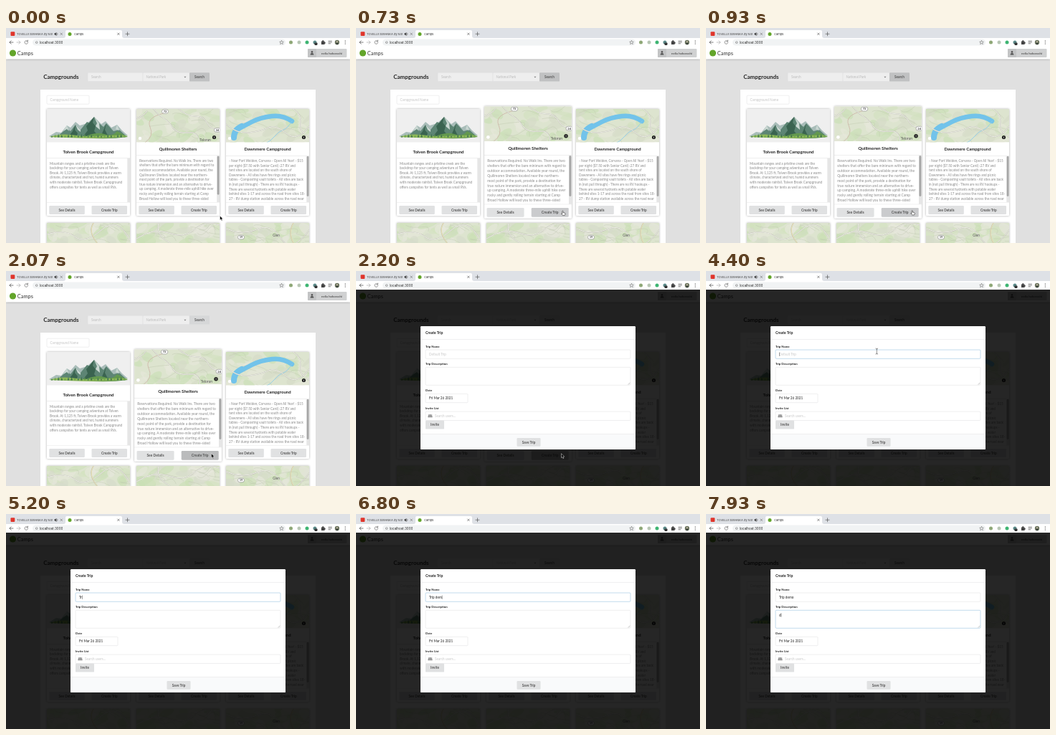
Recreate the animation shown at these times as an HTML page. Size 480 by 300 pixels, loop 8000 ms.

```html
<!DOCTYPE html>
<html lang="en">
<head>
<meta charset="utf-8">
<title>Camps</title>
<style>
html, body { margin: 0; width: 100%; height: 100%; overflow: hidden; background: #e0e0e0; }
svg { display: block; }
text { font-family: Lato, sans-serif; white-space: pre; }
.ui { font-family: Inter, sans-serif; }
.b { font-weight: 700; }
.mid { text-anchor: middle; }
.line { fill: none; stroke-linecap: round; stroke-linejoin: round; }
.raised { filter: drop-shadow(0 .6px 1.4px #0005); }
</style>
</head>
<body>
<svg id="stage" width="480" height="300" viewBox="0 0 480 300"></svg>
<script>
const LOOP = 8000, FPS = 15;
const GREY = '#e0e1e2', INK = '#222';

// Markup helpers
const rect = (x, y, w, h, fill, more = '') =>
  `<rect x="${x}" y="${y}" width="${w}" height="${h}" fill="${fill}" ${more}/>`;
const circle = (x, y, r, fill) => `<circle cx="${x}" cy="${y}" r="${r}" fill="${fill}"/>`;
const path = (d, fill, more = '') => `<path d="${d}" fill="${fill}" ${more}/>`;
const line = (d, color, width, more = '') =>
  `<path class="line" d="${d}" stroke="${color}" stroke-width="${width}" ${more}/>`;
const text = (x, y, s, size = 4.67, fill = INK, cls = '', more = '') =>
  `<text x="${x}" y="${y}" font-size="${size}" fill="${fill}" class="${cls}" ${more}>${s}</text>`;
const button = (x, y, w, h, label, id = '') =>
  rect(x, y, w, h, GREY, `rx="1.2" ${id && `id="${id}"`}`) +
  text(x + w / 2, y + h / 2 + 1.65, label, 4.67, '#555', 'b mid');
const field = (x, y, w, h, id = '', fill = '#fff') =>
  rect(x, y, w, h, fill, `rx="1.2" stroke="#dcdddf" stroke-width=".5" ${id && `id="${id}"`}`);

function random(seed) {
  return () => (seed = (seed * 16807) % 2147483647) / 2147483647;
}

function browser() {
  const extensions = [[397.5, '#8fa878'], [409, '#b9c7b5'], [420, '#3fb573'], [431, '#5d8b8a']];
  return rect(0, 0, 480, 14, '#dee1e6') +
    rect(6.5, 5.3, 5.8, 5.8, '#e0362c', 'rx="1"') +
    `<svg width="65" height="14">${text(15, 9.8, 'TOVELUI SERANKA by Nor', 4, '#444', 'ui')}</svg>` +
    path('M67.5 7.3h1.3l1.6-1.4v5l-1.6-1.4h-1.3z', '#444') +
    line('M71.6 7.2q1 1.2 0 2.4', '#444', .5) +
    line('M76 7l2.6 2.6m0-2.6l-2.6 2.6', '#555', .55) +
    path('M80 14q3 0 3-3V5q0-2 2-2h75q2 0 2 2v6q0 3 3 3z', '#fff') +
    circle(89, 8.5, 2.5, '#63a52b') + text(95, 9.9, 'Camps', 4, '#333', 'ui') +
    line('M155.6 7l2.6 2.6m0-2.6l-2.6 2.6M167 8.3h5m-2.5-2.5v5', '#444', .6) +
    rect(0, 14, 480, 12, '#fff') +
    rect(37, 15.4, 353, 9.2, '#f1f3f4', 'rx="4.6"') +
    line('M10 20H5m2.2-2.2L5 20l2.2 2.2', '#444', .7) +
    line('M15 20h5m-2.2-2.2L20 20l-2.2 2.2', '#aaa', .7) +
    line('M30.2 18.6A2.3 2.3 0 1 0 30.6 20.5M30.5 17v1.8h-1.8', '#555', .65) +
    circle(42.8, 20, 1.6, '#666') + circle(42.8, 20, 1, '#f1f3f4') +
    text(47, 21.6, 'localhost:3000', 4.6, '#222', 'ui') +
    path('M384.5 17.3l.8 1.9 2 .1-1.5 1.3.5 2-1.8-1.1-1.8 1.1.5-2-1.5-1.3 2-.1z', 'none', 'stroke="#555" stroke-width=".5"') +
    extensions.map(([x, c]) => circle(x, 20, 2.5, c)).join('') +
    rect(430.5, 20.5, 4, 3.4, '#333', 'rx=".8"') +
    path('M440 18.5h1.3q0-1.4 1-1.4t1 1.4h1.3v1.3q1.3 0 1.3 1t-1.3 1v1.2H440z', '#444') +
    line('M450 18.2h4.5M450 20h4.5M450 21.8h2.7', '#555', .7) +
    circle(462, 20, 3.2, '#6d7661') + circle(462, 19.4, 1.1, '#d0c3ae') + circle(462, 21.8, 1.5, '#38413a') +
    [17.9, 20, 22.1].map(y => circle(473.3, y, .55, '#444')).join('');
}

function terrain(x, y, h, seed, details) {
  const rnd = random(seed);
  let out = rect(0, 0, 116, h, '#dde4cf');
  for (let i = 0; i < 34; i++) {
    const cx = rnd() * 116, cy = rnd() * h;
    out += `<ellipse cx="${cx}" cy="${cy}" rx="${4 + rnd() * 12}" ry="${2 + rnd() * 6}"
      fill="${['#c9dfb4', '#e8e8dd', '#d3e2c0', '#d6dac9'][i % 4]}" opacity=".6" transform="rotate(${rnd() * 90 - 45} ${cx} ${cy})"/>`;
  }
  for (let i = 0; i < 10; i++) {
    const a = rnd() * 116, b = rnd() * h;
    out += line(`M${a} ${b}q${rnd() * 16} ${rnd() * 14 - 7} ${10 + rnd() * 14} ${rnd() * 12 - 6}t10 6`, '#bcc5ac', .4);
  }
  return `<svg x="${x}" y="${y}" width="116" height="${h}">${out}${details}</svg>`;
}
const road = (d, color = '#f6f6f0') => line(d, '#bfc0b4', 1.4) + line(d, color, .8);
const shield = (x, y, n) =>
  rect(x - 4.5, y - 2.8, 9, 5.6, '#fff', 'rx="2.8" stroke="#777" stroke-width=".5"') +
  text(x, y + 1.4, n, 4, '#444', 'b mid');
const mapMarks = circle(5, 41, 2.2, '#fff') + circle(108.5, 39.5, 2.6, '#222') +
  text(108.5, 41, 'i', 4.2, '#fff', 'b mid');

function mountains(x, y) {
  return `<g transform="translate(${x} ${y})">` + rect(0, 0, 116, 46.5, '#efefef') +
    path('M3 38L13 32 20 33 28 23 33 26 40 18 46 23 56 20 66 11 76 21 82 17 90 26 98 22 105 30 113 37z', '#a9bdb9') +
    path('M14 39L28 27 33 31 40 22 47 29 56 18 60 20 66 11 73 20 79 25 83 20 93 31 101 29 112 39z', '#5d8574') +
    path('M66 11L64 19 68 24 66 31 73 39H50L57 30 55 24z M40 22L39 29 43 34 41 39H30L36 31z M83 20l-2 9 5 10H75z', '#3a6350') +
    path('M66 11l4 9-2 4 6 5-1-9z M40 22l3 7 4 3v-3z M28 23l-5 8 5-3 3 3z M98 22l-2 6 5 2z', '#cbd8d3') +
    path('M50 40Q68 31 80 35T98 31L113 39Q84 43 50 40', '#63984f') +
    path('M3 39Q18 34 34 36T58 38 88 37 113 38Q78 43 3 39', '#8fb958') +
    Array.from({ length: 23 }, (_, i) => {
      const tx = 7 + i * 4.6, h = 2 + 3 * Math.abs(Math.sin(i * 2.3));
      return path(`M${tx} ${39.5 - h}l1.4 ${h}h-2.8z`, ['#3c704b', '#6ba24f', '#467a55'][i % 3]);
    }).join('') + '</g>';
}

function card(x, image, title, titleY, firstY, lines, thumbHeight, id) {
  const top = titleY + 9;
  return `<g id="${id}">` +
    rect(x, 113, 116, 149, '#fff', 'rx="1.2" class="raised"') + image +
    text(x + 58, titleY + 2, title, 6, INK, 'b mid') +
    rect(x, top, 116, .4, '#d5d5d5') +
    `<svg x="${x}" y="${top}" width="116" height="${243 - top}">` +
    lines.map((s, i) => text(4, firstY - top + 1.6 + i * 6.6, s, 4.67, '#8a8a8a')).join('') +
    rect(112.3, .4, 3.7, 70, '#e6e6e6') + rect(112.7, 1, 2.8, thumbHeight, '#a6a6a6', 'rx="1.4"') + '</svg>' +
    rect(x, 243, 116, .4, '#ddd') +
    button(x + 3.3, 248, 49.5, 12, 'See Details') +
    button(x + 62.5, 248, 49.5, 12, 'Create Trip', id + 'Create') + '</g>';
}

function page() {
  const shelterMap = terrain(182, 113, 46.5, 71,
    line('M12 47Q25 38 19 25T38 6', '#cdb7a8', .8) +
    road('M24 0Q31 9 38 13T51 26 72 33 87 46') + road('M59 0Q70 10 82 10T99 20 116 27') +
    road('M0 13Q10 10 15 3') +
    shield(40, 3.5, '72') + shield(113, 29.5, '24') + text(96, 44.5, 'Teloran', 4.8, '#555', 'mid') + mapMarks);
  const bayMap = terrain(307, 113, 46.5, 913,
    line('M11 40Q11 29 22 24', '#72c3ea', 8) +
    line('M14 29Q25 24 36 18T64 10Q79 8 92 17', '#72c3ea', 6.5) +
    line('M92 17Q86 27 80 29T68 38 57 47', '#86cbec', .8) +
    road('M0 21Q15 35 32 33T59 26 84 34 116 24') + road('M94 0Q106 8 104 20T116 39') +
    mapMarks);
  const below = [
    terrain(57, 272, 28, 43, road('M0 16Q25 8 39 19T76 10 116 24') + road('M65 0Q57 12 70 28', '#f3e6af')),
    terrain(182, 272, 28, 287, road('M0 22Q24 6 45 14T81 9 116 3') + road('M31 0Q26 17 47 28')),
    terrain(307, 272, 28, 519, road('M0 8Q23 18 43 9T77 22 116 10') + road('M94 0Q86 14 94 28', '#f3e6af') +
      text(70, 18.5, 'Glen', 4.7, '#555', 'mid') + shield(21, 20, '19'))
  ];
  return rect(0, 26, 480, 274, '#e0e0e0') +
    rect(0, 26, 480, 17.5, '#fff', 'class="raised"') +
    circle(9.5, 35, 4.6, '#63a52b') + text(15.8, 37.5, 'Camps', 7.4, '#333') +
    rect(421, 29, 54.5, 12, '#d0d1d2', 'rx="1.2"') + rect(421, 29, 12, 12, '#c3c4c5', 'rx="1.2"') +
    circle(427, 33.4, 1.3, '#555') + path('M424.5 37.5q0-2.4 2.5-2.4t2.5 2.4z', '#555') +
    text(454.5, 36.7, 'nelia hokorashi', 4.3, '#555', 'b mid') +
    text(52.2, 71.3, 'Campgrounds', 8, INK, 'b') +
    field(114, 62.3, 77, 12.2, '', '#eee') + text(119, 70.1, 'Search', 4.67, '#bbb') +
    field(191, 62.3, 65, 12.2, '', '#eee') + text(195.5, 70.1, 'National Park', 4.67, '#bbb') +
    path('M248.4 67.8h3l-1.5 1.7z', '#777') +
    rect(256, 62.2, 28, 12.4, GREY, 'id="search" rx="1.2"') + text(270, 70.1, 'Search', 4.67, '#555', 'b mid') +
    rect(48, 86, 384, 214, '#fff') +
    field(57, 94.2, 59, 12) + text(61.5, 101.8, 'Campground Name', 4.67, '#c4c4c4') +
    below.map((map, i) => rect(57 + i * 125, 272, 116, 40, '#fff', 'class="raised"') + map).join('') +
    card(57, mountains(57, 113), 'Tolven Brook Campground', 172.5, 189, [
      'Mountain ranges and a pristine creek are the',
      'backdrop for your camping adventure at Tolven',
      'Brook. At 1,125 ft, Tolven Brook provides a warm',
      'climate, characterized and hot, humid summers',
      'with moderate rainfall. Tolven Brook Campground',
      'offers campsites for tents as well as small RVs.'], 0, 'brook') +
    card(307, bayMap, 'Dawnmere Campground', 169, 185.3, [
      '- Near Fort Welden, Corvana - Open All Year! - $15',
      'per night ($7.50 with Senior Card) -27 RV and',
      'tent sites are located on the south shore of',
      'Dawnmere - All sites have fire rings and picnic',
      'tables - Composting vault toilets - All sites are back',
      'in (not pull through) - There are no RV hookups -',
      'There are several hydrants with potable water',
      'behind sites 1-17 and across the road from sites 18-',
      '27 - RV dump station available across the road near'], 56, 'bay') +
    card(182, shelterMap, 'Quillmoren Shelters', 168.7, 185.3, [
      'Reservations Required. No Walk Ins. There are two',
      'shelters that offer the bare minimum with regard to',
      'outdoor accommodation. Available year round, the',
      'Quillmoren Shelters located near the northern-',
      'most point of the park, provide a destination for',
      'true nature immersion and an alternative to drive-',
      'up camping. A moderate three-mile uphill hike over',
      'rocky and gently rolling terrain starting at Camp',
      'Broad Hollow will lead you to these three-sided'], 54, 'shelter');
}

function modal() {
  const label = (y, s) => text(97, y, s, 4.3, INK, 'b');
  return '<g id="modal">' + rect(0, 26, 480, 274, '#000', 'opacity=".85"') +
    rect(90, 77, 300, 172, '#fff', 'rx="1.3"') +
    text(97, 88, 'Create Trip', 5, INK, 'b') + rect(90, 95.3, 300, .4, '#d9dadb') +
    label(106.8, 'Trip Name') + field(97, 110, 286, 12.3, 'name') +
    text(102, 117.9, 'Default Trip', 4.67, '#c8c8c8', '', 'id="hint"') +
    label(131.4, 'Trip Description') + field(97, 134.3, 286, 25, 'about') +
    line('M379.5 158.3l2.5-2.5m-1.2 2.5l1.2-1.2', '#888', .35) +
    label(168.4, 'Date') + field(97, 171.4, 59, 12.3) + text(102, 179.3, 'Fri Mar 26 2021') +
    label(193, 'Invite List') + field(97, 196.2, 286, 12.3) +
    [101.5, 103.5, 105.5].map((x, i) => circle(x, 201.3, i === 1 ? 1.05 : .75, '#555') +
      path(`M${x - 1.2} 204q0-1.6 1.2-1.6t1.2 1.6z`, '#555')).join('') +
    text(110, 204, 'Search users...', 4.67, '#c8c8c8') +
    button(97, 208.6, 26, 12, 'Invite') +
    path('M90 227.5h300v20.2q0 1.3-1.3 1.3H91.3Q90 249 90 247.7z', '#f9fafb') +
    rect(90, 227.3, 300, .4, '#d9dadb') + button(224.5, 233, 33, 11.7, 'Save Trip') +
    text(102, 117.9, '', 4.67, INK, '', 'id="nameText"') + text(102, 142.7, '', 4.67, INK, '', 'id="aboutText"') +
    rect(0, 0, .4, 5.4, '#111', 'id="caret"') + '</g>';
}

const cursors =
  `<g id="arrow">${path('M0 0V6L1.4 4.8 2.4 7 3.4 6.5 2.4 4.4H4.2z', '#000', 'stroke="#fff" stroke-width=".45"')}</g>` +
  `<g id="hand">${path('M0 .6Q.7-.5 1.3.6V2.6q2.8 0 3 1.4 0 1.2-.8 2.4H.6Q-.2 5.4-1.3 4.3q.2-1.1 1.3 0z', '#fff', 'stroke="#000" stroke-width=".5"')}</g>` +
  `<g id="ibeam">${line('M-1.3-4q1.3 0 1.3 1V3q0 1-1.3 1M1.3-4q-1.3 0-1.3 1M0 3q0 1 1.3 1', '#222', .5)}</g>`;

const stage = document.getElementById('stage');
stage.innerHTML = page() + modal() + browser() + cursors;
const get = id => document.getElementById(id);
const show = (id, on) => get(id).setAttribute('visibility', on ? 'visible' : 'hidden');

// Timelines: [time in ms, value...]
const pointerTrack = [
  [0, 298.5, 262], [70, 298, 262], [400, 291, 257], [870, 287, 254.5], [1800, 287, 254.5], [1930, 286.5, 254.7],
  [2870, 286.5, 254.7], [3130, 264, 165], [3400, 242, 71], [3600, 236.7, 105], [3730, 238, 111],
  [4200, 238, 112], [4400, 238.3, 112], [7300, 229.5, 118], [7670, 229.5, 142.5], [8000, 229.5, 142.5]
];
const pointerShape = [[0, 'arrow'], [600, 'hand'], [1930, 'arrow'], [3730, 'ibeam'], [4930, ''], [7330, 'ibeam'], [7930, '']];
const typedName = [[0, ''], [4930, 'T'], [5200, 'Tr'], [5470, 'Tri'], [5670, 'Trip'], [6000, 'Trip '],
  [6330, 'Trip d'], [6600, 'Trip de'], [6800, 'Trip dem'], [6930, 'Trip demo']];
const focused = [[0, ''], [3930, 'name'], [7870, 'about']];
const createFill = [[0, GREY], [600, '#cacbcd'], [1330, '#babbbc'], [2930, GREY]];
const searchFill = [[0, '#c0c1c2'], [1330, '#d6d7d8']];
const caretOn = [[0, 0], [4000, 1], [4200, 0], [4400, 1], [7330, 0], [7670, 1]];

const at = (track, t) => track.filter(key => key[0] <= t).pop()[1];
const ease = x => { x = Math.max(0, Math.min(1, x)); return x * x * (3 - 2 * x); };

function pointerAt(t) {
  const i = Math.max(1, pointerTrack.findIndex(key => key[0] > t));
  const [t0, x0, y0] = pointerTrack[i - 1], [t1, x1, y1] = pointerTrack[i];
  const k = ease((t - t0) / (t1 - t0));
  return [x0 + (x1 - x0) * k, y0 + (y1 - y0) * k];
}

function draw(t) {
  const scale = 1 + .05 * (ease((t - 130) / 300) - ease((t - 2930) / 300));
  get('shelter').setAttribute('transform', `translate(240 187.5) scale(${scale}) translate(-240 -187.5)`);
  get('shelterCreate').setAttribute('fill', at(createFill, t));
  get('search').setAttribute('fill', at(searchFill, t));

  const open = t >= 2200, name = at(typedName, t), focus = at(focused, t);
  get('modal').style.display = open ? '' : 'none';
  get('nameText').textContent = name;
  get('aboutText').textContent = t >= 7930 ? 'd' : '';
  get('hint').style.display = name ? 'none' : '';
  for (const id of ['name', 'about']) get(id).setAttribute('stroke', focus === id ? '#85b7d9' : '#dcdddf');
  get('caret').style.display = focus && at(caretOn, t) ? '' : 'none';
  if (open && focus) {
    get('caret').setAttribute('x', 102.1 + get(focus + 'Text').getComputedTextLength());
    get('caret').setAttribute('y', focus === 'name' ? 113.5 : 138.3);
  }

  const shape = at(pointerShape, t);
  for (const id of ['arrow', 'hand', 'ibeam']) show(id, id === shape);
  if (shape) get(shape).setAttribute('transform', `translate(${pointerAt(t)})`);
}

const start = performance.now();
function tick() {
  const t = (performance.now() - start) % LOOP;
  draw(Math.floor((t + 5) * FPS / 1000) * 1000 / FPS % LOOP + 4);
  requestAnimationFrame(tick);
}
tick();
</script>
</body>
</html>
```
